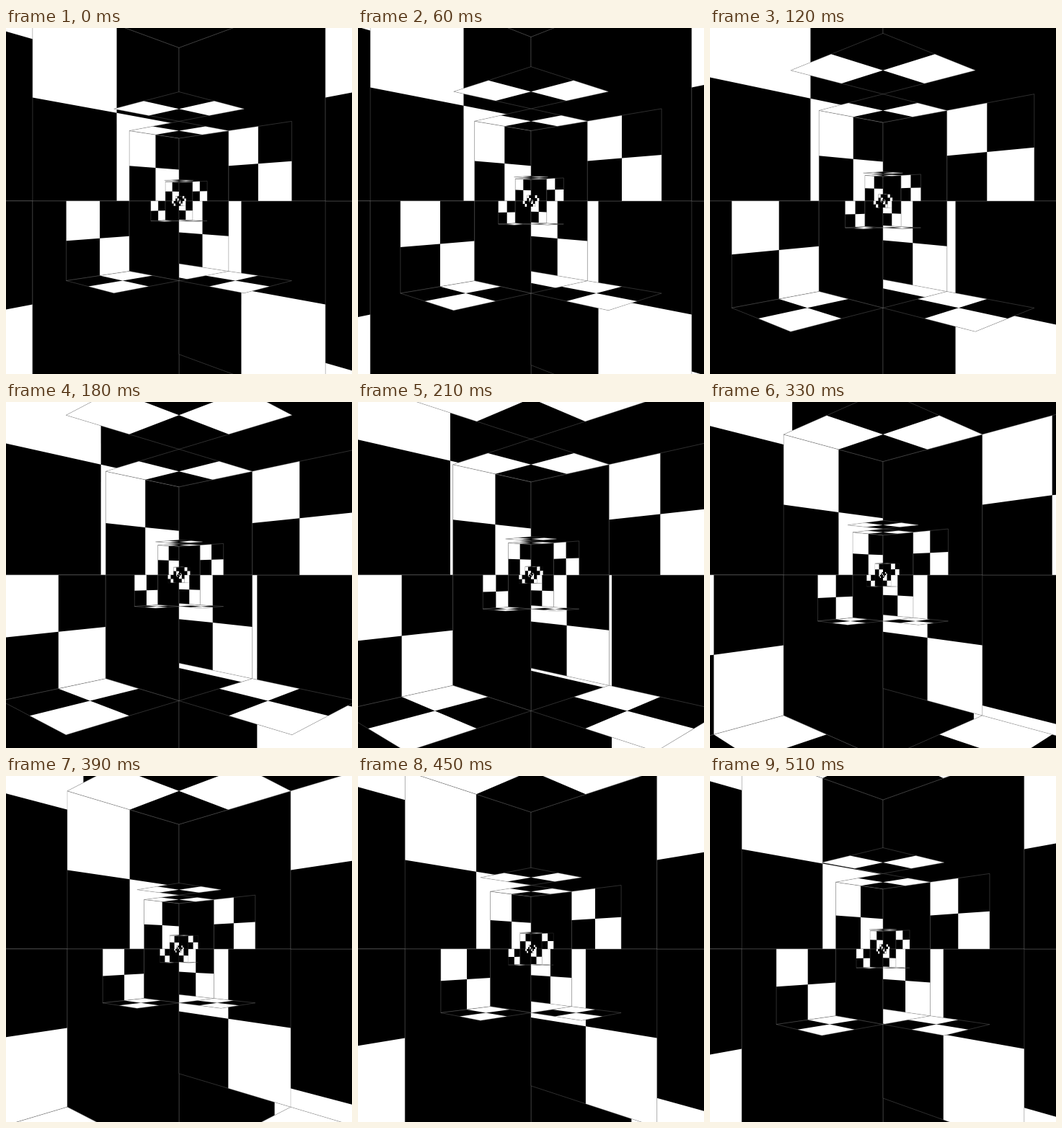
These frames come from a looping animation (480x480 px, 540 ms). An HTML page with a canvas:

```html
<!DOCTYPE html>
<html lang="en">
<head>
<meta charset="utf-8">
<title>Nested checker rooms</title>
<style>
  html, body { margin: 0; width: 100%; height: 100%; overflow: hidden; background: #000; }
  canvas { display: block; width: 480px; height: 480px; }
</style>
</head>
<body>
<canvas id="stage" width="480" height="480"></canvas>
<script>
const ctx = document.getElementById('stage').getContext('2d');
const STEP = 30, STEPS = 18;
const CENTER = 240;
const FOCAL = 240 / Math.tan(Math.PI / 8);   // 45 degree field of view
const RATIO = 4;                             // size ratio between nested rooms
const DEPTH = 5.24;                          // distance to the vanishing room, in room heights

// [step, share of one full zoom]
const ZOOM = [[0, 0], [4, .212], [6, .329], [9, .497], [11, .605], [13, .718], [17, .96], [18, 1]];

// Plan coordinates are in half diagonals (x right, z away), heights in room heights.
const wall = (x, z, dz, top, plain) => ({ o: [x, top, z], u: [1, 0, dz], v: [0, -1, 0], plain });
const slab = (x, y, z, ux, uz, vx, vz) => ({ o: [x, y, z], u: [ux, 0, uz], v: [vx, 0, vz] });

const FACES = [
  wall(-1, 1, 1, 1),
  wall(0, 2, -1, 1, true),
  wall(1, 1, -1, 1),
  wall(-2, 0, 1, 0),
  wall(-1, 1, -1, 0, true),
  wall(0, 2, -1, 0),
  slab(-1, 1, 1, 1, 1, 1, -1),
  slab(-1, 1, -1, 1, 1, 1, -1),
  slab(-1, -1, 1, 1, -1, -1, -1),
  slab(1, -1, 1, 1, -1, -1, -1)
];

function zoomAt(step) {
  const i = ZOOM.findIndex(p => p[0] > step);
  const [a, p] = ZOOM[i - 1], [b, q] = ZOOM[i];
  return p + (q - p) * (step - a) / (b - a);
}

function project([x, y, z], depth) {
  const scale = FOCAL / Math.max(.05, depth + z * Math.SQRT1_2);
  return [CENTER + x * Math.SQRT1_2 * scale, CENTER - y * scale];
}

// Traces the part of a face that starts at (a, b) and has the given size.
function trace(face, depth, a, b, size) {
  const at = (s, t) => project(face.o.map((c, k) => c + face.u[k] * s + face.v[k] * t), depth);
  ctx.beginPath();
  ctx.moveTo(...at(a, b));
  ctx.lineTo(...at(a + size, b));
  ctx.lineTo(...at(a + size, b + size));
  ctx.lineTo(...at(a, b + size));
  ctx.closePath();
}

function drawRoom(depth) {
  const fade = Math.min(1, FOCAL / depth / 30);
  for (const face of FACES) {
    ctx.fillStyle = '#000';
    trace(face, depth, 0, 0, 1);
    ctx.fill();
    if (!face.plain) {
      ctx.fillStyle = '#fff';
      for (const c of [0, .5]) {
        trace(face, depth, c, c, .5);
        ctx.fill();
      }
    }
    ctx.strokeStyle = `rgba(128,128,128,${.45 * fade * fade})`;
    ctx.lineWidth = .8;
    trace(face, depth, 0, 0, 1);
    ctx.stroke();
  }
}

function draw(step) {
  const nearest = DEPTH / RATIO ** zoomAt(step);
  ctx.fillStyle = '#000';
  ctx.fillRect(0, 0, 480, 480);
  for (let n = -2; n <= 4; n++) drawRoom(nearest * RATIO ** n);
}

const start = performance.now();
function tick() {
  const t = Math.max(0, performance.now() - start);
  draw(Math.floor(t / STEP) % STEPS);
  requestAnimationFrame(tick);
}
tick();
</script>
</body>
</html>
```
